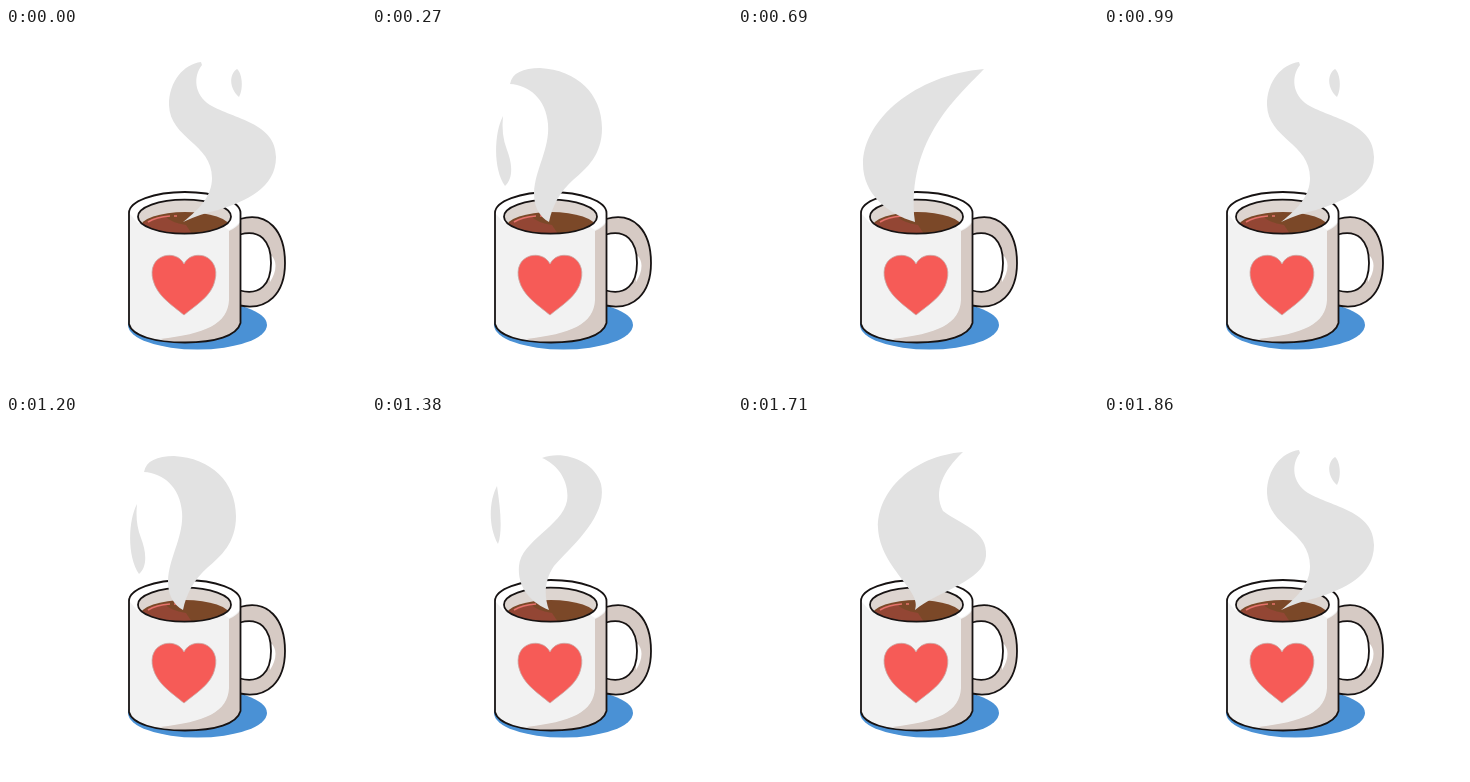
Recreate the animation shown at these times as an HTML page. Size 360 px wide and 360 px high, loop 1.89 s.

```html
<!DOCTYPE html>
<html lang="en">
<head>
<meta charset="utf-8">
<title>Steaming mug</title>
<style>
  html, body { margin: 0; width: 100%; height: 100%; overflow: hidden; background: #fff; }
  svg { display: block; width: 100%; height: 100%; }
  .line { fill: none; stroke: #171313; stroke-width: 1.8; stroke-linecap: round; }
</style>
</head>
<body>
<svg viewBox="0 0 360 360">
  <defs>
    <clipPath id="body"><path id="bodyShape" d="M123 185V296C126 308 149 314.500 179 314.500S231 308 234.500 295V185A55.750 21 0 0 0 123 185Z"/></clipPath>
    <clipPath id="opening"><ellipse cx="178.500" cy="188.700" rx="46.500" ry="17"/></clipPath>
  </defs>

  <ellipse cx="191.500" cy="297" rx="69.500" ry="24.500" fill="#4a91d5"/>

  <!-- handle -->
  <path d="M234 191C262 183 279 203 279 235C279 265 262 283 234 277.500Z" fill="#d6cac4"/>
  <path d="M234 206.500C254 201 265 213 265 235C265 256 254 268 234 262.500Z" fill="#fff"/>
  <path d="M264 226Q275 236 264 254Z" fill="#fff"/>
  <path class="line" d="M234 191C262 183 279 203 279 235C279 265 262 283 234 277.500M234 206.500C254 201 265 213 265 235C265 256 254 268 234 262.500"/>

  <!-- cup -->
  <use href="#bodyShape" fill="#f2f2f2"/>
  <g clip-path="url(#body)">
    <path d="M236 192Q231 200 223 203V272C222 296 199 306 154 311L178 318H238Z" fill="#d6cac4"/>
    <path d="M123 185A56 21 0 0 1 235 185V192Q230 199 223 202L178 172L132 195Z" fill="#fff"/>
  </g>
  <use href="#bodyShape" class="line"/>

  <!-- coffee -->
  <g clip-path="url(#opening)">
    <rect x="130" y="170" width="98" height="38" fill="#ddd5d0"/>
    <ellipse cx="179" cy="199.500" rx="45" ry="15.500" fill="#7b4828"/>
    <path d="M136 196Q146 189 160 189Q164 194 180 197L186 206H145Z" fill="#934634"/>
    <path d="M142 194Q150 189 164 188M168 188h3" fill="none" stroke="#e5716a" stroke-width="1.500"/>
  </g>
  <ellipse class="line" cx="178.500" cy="188.700" rx="46.500" ry="17"/>

  <path d="M178 236C174 228 165 226 158 228C148 231 144 241 147 252C151 268 166 277 178 287C190 277 206 268 209 252C212 241 207 231 198 228C190 226 182 228 178 236Z" fill="#f65b57" stroke="#c9a9a5" stroke-width=".8"/>
  <path id="steam" fill="#e2e2e2"/>
</svg>
<script>
  const LOOP = 1890, HOLD = 135, LEAD = 50;
  const poses = [
    "M177 194C195 180 206 167 206 150C206 115 164 111 163 77C163 53 178 36 195 34L196 37C187 48 188 67 204 77C228 91 270 95 270 129C270 160 240 173 212 182Q194 186 177 194ZM231 41C223 46 223 60 233 69C238 60 236 45 231 41Z",
    "M177 194C184 176 189 160 188 140C187 114 176 108 172 82Q169 59 158 47C170 36 190 37 205 46C228 60 252 85 252 115C252 150 210 164 177 194Z",
    "M177 194C168 189 162 180 162 165C163 141 178 121 176 96C174 71 157 57 138 56C140 45 151 40 168 40C205 42 230 66 230 100C230 127 215 140 201 152Q182 169 177 194ZM131 88C122 105 121 141 133 158C142 150 140 135 135 122Q129 107 131 88Z",
    "M177 194C160 187 145 172 147 150C149 125 190 110 195 85C198 65 185 48 170 42C190 34 222 44 229 68C236 100 200 130 182 150C172 165 172 180 177 194ZM125 70C117 85 116 110 126 128C131 115 128 90 125 70Z",
    "M175 194C150 190 129 170 132 146C135 109 173 95 197 81Q215 70 229 43C230 72 225 92 207 113C192 130 172 142 168 160Q167 178 175 194Z",
    "M177 194C150 186 125 166 125 136C125 92 177 47 246 41C224 65 167 110 177 194Z",
    "M177 194C185 175 142 152 140 112C139 75 175 40 225 36C205 55 195 75 205 95C225 110 250 115 248 140C246 165 200 175 177 194Z"
  ];
  const steam = document.getElementById("steam");
  const start = performance.now();

  function draw() {
    const time = (performance.now() - start) % LOOP;
    steam.setAttribute("d", poses[Math.floor((time + LEAD) / HOLD) % poses.length]);
    requestAnimationFrame(draw);
  }
  draw();
</script>
</body>
</html>
```
